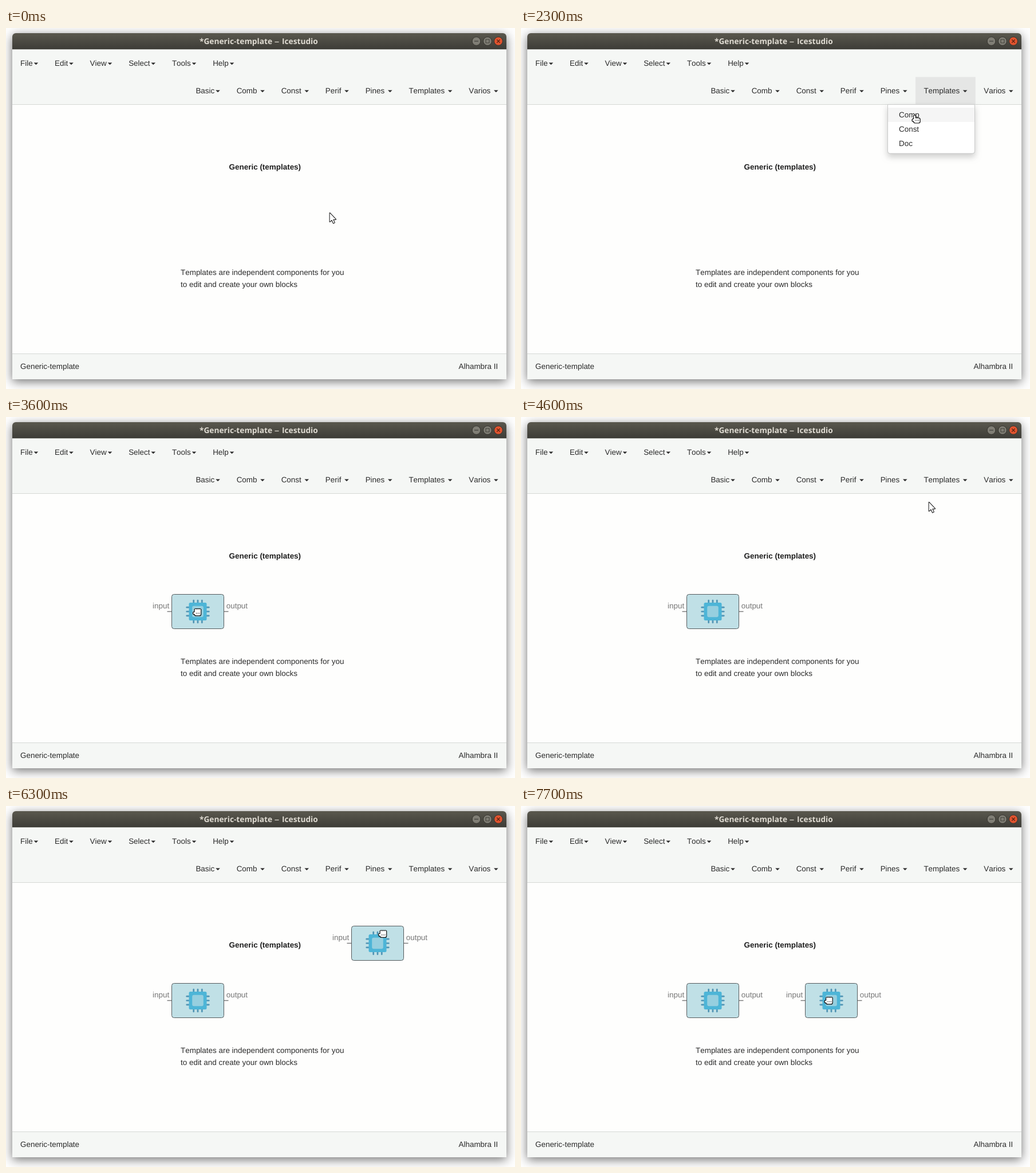
Animation of 889x630 px, one loop 8 s. Source, as an HTML page with a canvas:

```html
<!DOCTYPE html>
<html lang="en">
<head>
<meta charset="utf-8">
<title>Generic-template</title>
<style>
html, body { margin: 0; width: 100%; height: 100%; overflow: hidden; background: #fff; }
canvas { display: block; }
</style>
</head>
<body>
<canvas id="stage" width="889" height="630"></canvas>
<script>
const ctx = document.getElementById('stage').getContext('2d');
const LOOP = 8000;
const STEP = 100;
const U = 0.96;             // interface scale
const GRID = 8 * U;
const HOME = { x: 289, y: 309.3 };  // where the first block is dropped
const SANS = '"Liberation Sans", Arial, sans-serif';
const FONT = `${14 * U}px ${SANS}`;
const BOLD = `bold ${14 * U}px ${SANS}`;
const INK = '#2b2b2b';

ctx.fontKerning = 'none';
ctx.textRendering = 'geometricPrecision';

const MENU = ['File', 'Edit', 'View', 'Select', 'Tools', 'Help'];
const BLOCKS = ['Basic', 'Comb ', 'Const ', 'Perif ', 'Pines ', 'Templates ', 'Varios '];
const ITEMS = ['Comp', 'Const', 'Doc'];

const move = (from, to, x, y) => ({ from, to, x, y });
const jump = (when, x, y) => move(when - STEP, when, x, y);

// Each path starts somewhere and rests between its moves
const POINTER = [
  jump(0, 565, 322), jump(400, 611, 277),
  move(500, 1100, 719, 118), jump(1800, 720, 124),
  move(1900, 2300, 690, 159), move(2800, 3000, 675.5, 172.5),
  move(3000, 3600, 333.5, 340.5), move(4100, 4400, 616, 217),
  jump(4600, 712, 148), jump(4800, 719, 116),
  move(5000, 5600, 694, 155.5), move(5800, 6300, 657.5, 223),
  move(6300, 6700, 538, 321), move(6800, 7300, 533, 338),
  jump(7700, 537, 339.5)
];
// Block paths in grid cells from HOME
const FIRST = [
  jump(2700, 46, -23), move(2800, 3000, 45, -22),
  move(3000, 3500, 1, 1), move(3500, 3600, 0, 0)
];
const SECOND = [
  jump(5900, 46, -22), move(5900, 6300, 41, -13), move(6300, 6700, 26, -2),
  move(6800, 7300, 26, 0), jump(7700, 27, 0)
];

const within = (t, a, b) => t >= a && t < b;

function at(path, t) {
  let { x, y } = path[0];
  for (const m of path) {
    const p = Math.min(1, Math.max(0, (t - m.from) / (m.to - m.from)));
    x += (m.x - x) * p;
    y += (m.y - y) * p;
  }
  return { x, y };
}

function rect(x, y, w, h, fill) {
  ctx.fillStyle = fill;
  ctx.fillRect(x, y, w, h);
}

function round(x, y, w, h, r, fill, stroke) {
  ctx.beginPath();
  ctx.roundRect(x, y, w, h, r);
  ctx.fillStyle = fill;
  ctx.fill();
  if (!stroke) return;
  ctx.strokeStyle = stroke;
  ctx.lineWidth = 1;
  ctx.stroke();
}

function line(x1, y1, x2, y2, color, width) {
  ctx.beginPath();
  ctx.moveTo(x1, y1);
  ctx.lineTo(x2, y2);
  ctx.strokeStyle = color;
  ctx.lineWidth = width;
  ctx.stroke();
}

function text(s, x, y, color = INK, font = FONT, align = 'left') {
  ctx.font = font;
  ctx.textAlign = align;
  ctx.fillStyle = color;
  ctx.fillText(s, x, y);
}

function shadowed(color, blur, dy, paint) {
  ctx.save();
  ctx.shadowColor = color;
  ctx.shadowBlur = blur;
  ctx.shadowOffsetY = dy;
  paint();
  ctx.restore();
}

function windowButton(x, fill) {
  ctx.beginPath();
  ctx.arc(x, 23, 7.4, 0, 7);
  ctx.fillStyle = fill;
  ctx.fill();
  ctx.strokeStyle = '#35342f';
  ctx.lineWidth = 1;
  ctx.stroke();
}

function titleBar() {
  const top = [6, 6, 0, 0];
  const shade = ctx.createLinearGradient(0, 9, 0, 37.5);
  shade.addColorStop(0, '#5a584e');
  shade.addColorStop(1, '#3d3c37');
  round(11, 9, 863, 28.5, top, shade);

  const font = 'bold 13.7px "Open Sans", "Noto Sans", sans-serif';
  text('*Generic-template', 338, 28, '#dfdbd2', font);
  text('–', 473, 29, '#dfdbd2', '17px "Open Sans", sans-serif', 'center');
  text('Icestudio', 482, 28, '#dfdbd2', font);

  windowButton(821.5, '#807e75');
  line(818, 23, 825, 23, '#3f3e39', 1.2);
  windowButton(841, '#807e75');
  ctx.strokeStyle = '#3f3e39';
  ctx.strokeRect(838, 20, 6, 6);
  windowButton(860, '#e2542f');
  for (const s of [-2.7, 2.7]) line(860 - s, 20.3, 860 + s, 25.7, '#5f2413', 1.3);
}

function frame() {
  rect(0, 0, 889, 630, '#fff');
  shadowed('rgba(0,0,0,.56)', 18, 4, () => round(11, 9, 863, 604, [6, 6, 0, 0], '#fefefd'));
  titleBar();
  rect(11, 37.5, 863, 96, '#f5f7f5');
  rect(11, 133, 863, 1, '#d5d8d5');
  rect(11, 568, 863, 45, '#f5f7f5');
  rect(11, 568, 863, 1, '#d5d8d5');
  text('Generic-template', 25, 595);
  text('Alhambra II', 859.2, 595, INK, FONT, 'right');
}

function menuRow(labels, x, y, active) {
  const pad = 15 * U;
  for (const s of labels) {
    ctx.font = FONT;
    const w = ctx.measureText(s).width;
    const full = w + 10 * U + 2 * pad;
    if (s === active) rect(x - pad, 85.5, full, 48, '#e5e6e5');
    text(s, x, y);
    const c = x + w + 2 * U, top = y - 5.6;
    ctx.beginPath();
    ctx.moveTo(c, top);
    ctx.lineTo(c + 8 * U, top);
    ctx.lineTo(c + 4 * U, top + 4 * U);
    ctx.fill();
    x += full;
  }
}

function dropdown(y) {
  const low = [0, 0, 4, 4];
  shadowed('rgba(0,0,0,.18)', 11, 5.5, () =>
    round(640.5, 133.5, 152, 85.5, low, '#fff', '#c9cac9'));
  round(640.5, 133.5, 152, 85.5, low, '#fff', '#c9cac9');
  ITEMS.forEach((s, i) => {
    const top = 139 + i * 25;
    if (within(y, top, top + 25)) rect(641, top, 151, 25, '#f5f5f5');
    text(s, 660, top + 17.2);
  });
}

function chip(x, y) {
  ctx.save();
  ctx.translate(x, y);
  ctx.lineCap = 'round';
  for (const d of [-7.3, 0, 7.3]) {
    line(d, -19.3, d, 19.3, '#5094b4', 2.7);
    line(-19.3, d, 19.3, d, '#5094b4', 2.7);
  }
  round(-15.5, -15.5, 31, 31, 2.5, '#4db5d7');
  round(-9.8, -9.8, 19.6, 19.6, 3, '#96cfdf');
  ctx.restore();
}

function block(cell) {
  const x = Math.floor(HOME.x + Math.round(cell.x) * GRID) + 0.5;
  const y = Math.floor(HOME.y + Math.round(cell.y) * GRID) + 0.5;
  line(x - 8, y + 30, x, y + 30, '#777', 1.4);
  line(x + 91, y + 30, x + 99, y + 30, '#777', 1.4);
  round(x, y, 91, 60, 4, '#c0e0e6', '#565b5d');
  chip(x + 45.5, y + 30);
  text('input', x - 33.4, y + 24.2, '#777');
  text('output', x + 95.2, y + 24.2, '#777');
}

function outlined(shape, width) {
  ctx.lineJoin = 'round';
  ctx.strokeStyle = '#111';
  ctx.lineWidth = width;
  ctx.stroke(shape);
  ctx.fillStyle = '#fff';
  ctx.fill(shape);
}

function arrow() {
  outlined(new Path2D('M.6 1V16L4.2 12.8 6.8 18.6 8.8 17.7 6.2 12H11Z'), 2);
}

function hand(closed) {
  const shape = new Path2D();
  shape.roundRect(-6.4, 0, 5, 3.6, 1.7);
  shape.roundRect(-3.8, closed ? -3.5 : -1.6, 10.4, closed ? 9.3 : 8, 2.4);
  const fingers = closed ? 4 : 1;
  for (let i = 0; i < fingers; i++) shape.roundRect(-3.8 + 2.6 * i, closed ? -5.4 : -6.6, 2.6, 8, 1.3);
  outlined(shape, 2.4);
  for (const d of [-1, 1.7, 4.4]) line(d, 1.2, d, 2.8, '#222', 1.1);
}

function pointer(t, { x, y }) {
  const dragging = within(t, 2700, 3800) || t >= 5900;
  const overMenu = within(t, 1100, 2700) || within(t, 4800, 5900);
  ctx.save();
  ctx.translate(x, y);
  if (dragging || overMenu) hand(dragging);
  else arrow();
  ctx.restore();
}

function draw(ms) {
  const t = Math.floor((ms % LOOP) / STEP) * STEP;
  const pos = at(POINTER, t);
  const open = within(t, 1300, 2700) || within(t, 5100, 5900);

  frame();
  menuRow(MENU, 25, 66);
  menuRow(BLOCKS, 331.4, 114, open ? 'Templates ' : null);
  text('Generic (templates)', 389.6, 247.3, '#1e1e1e', BOLD);
  text('Templates are independent components for you', 305, 431.3);
  text('to edit and create your own blocks', 305, 451.5);

  ctx.save();
  ctx.beginPath();
  ctx.rect(11, 134, 863, 434);
  ctx.clip();
  for (const path of [FIRST, SECOND]) {
    if (t >= path[0].to) block(at(path, t));
  }
  ctx.restore();

  if (open) dropdown(pos.y);
  pointer(t, pos);
}

function tick(now) {
  draw(now);
  requestAnimationFrame(tick);
}
draw(0);
requestAnimationFrame(tick);
</script>
</body>
</html>
```
